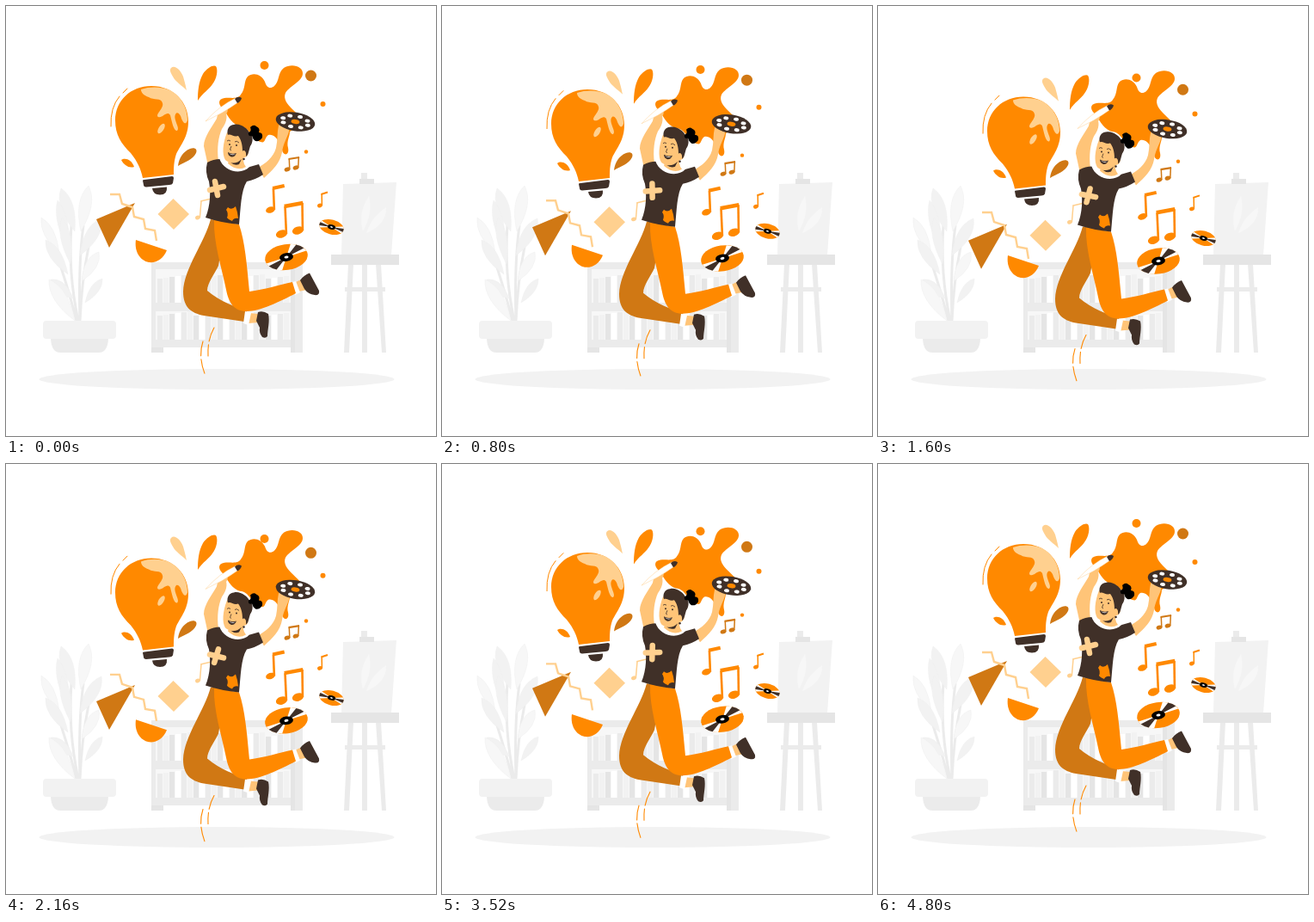
An HTML page for the animation above (4840 ms loop, 500x500 px).

```html
<!DOCTYPE html>
<html lang="en">
<head>
<meta charset="utf-8">
<title>Creative leap</title>
<style>
html, body { margin: 0; width: 100%; height: 100%; overflow: hidden; background: #fff; }
svg { display: block; width: 100vw; height: 100vh; }
.o { fill: #ff8900; } .b { fill: #d07814; } .l { fill: #ffd08f; }
.d { fill: #403028; } .s { fill: #ffc478; } .w { fill: #fff; }
.ln { fill: none; stroke: #ff8900; stroke-linecap: round; }
.g1 { fill: #f2f2f2; } .g2 { fill: #ebebeb; } .g3 { fill: #e5e5e5; } .g4 { fill: #f7f7f7; }
</style>
</head>
<body>
<svg viewBox="0 0 500 500">
  <g id="room">
    <ellipse class="g1" cx="245" cy="434" rx="206.5" ry="12"/>
    <g id="plant"></g>
    <path class="g2" d="M52 387H119Q118 403 108 403H63Q53 403 52 387Z"/>
    <rect class="g1" x="43" y="366" width="85" height="21" rx="4"/>
    <path class="g4" d="M174 306H331V389H174Z"/>
    <g id="books"></g>
    <path class="g2" d="M169 298H345V403H331V397H183V403H169Z M174 306V345H331V306Z M174 355V388H331V355Z" fill-rule="evenodd"/>
    <path class="g3" d="M331 298H336V403H331Z M169 397H183V403H169Z"/>
    <path class="g2" d="M398 300H404L399 403H393Z M430 300H436L442 403H437Z M414 300H420V403H414Z M394 327H441V332H394Z M413 194H420V207H413Z"/>
    <path class="g1" d="M392 207L454 205L448 290H390Z"/>
    <path class="g3" d="M411 201H428V207H411Z M378 289H457V301H378Z"/>
    <path class="g4" d="M415 262Q409 240 422 221Q427 241 415 262Z M419 264Q424 246 442 234Q443 254 419 264Z"/>
  </g>

  <path data-m="8 2400" class="o" d="M254 121C246 115 246 108 254 107C262 106 269 109 273 103C279 96 276 88 281 82C287 77 297 79 301 88C303 95 307 97 312 93C318 88 316 77 323 72C332 66 346 70 345 79C344 88 331 92 325 101C322 108 327 114 333 120C340 127 345 130 345 138L330 146C330 152 326 157 328 165C330 174 322 175 321 167C318 158 313 148 305 150C300 154 302 160 296 158C285 155 283 140 272 140C264 138 258 129 254 121Z"/>
  <circle data-m="18 2250" class="o" cx="300.5" cy="69" r="5"/>
  <circle data-m="24 2600" class="b" cx="354.5" cy="81" r="6.5"/>
  <circle data-m="17 2600" class="o" cx="368.5" cy="114" r="3"/>
  <circle data-m="13 2100" class="o" cx="349" cy="169.5" r="2.2"/>

  <path data-m="14 2000" class="l" d="M192 72C196 68 203 74 206 82C208 89 209 93 210 98C204 92 197 88 194 82C191 77 190 74 192 72Z"/>
  <path data-m="13 2200" class="o" d="M244 70C247 74 245 85 240 91C236 97 229 101 223 110C223 99 224 88 229 79C234 71 242 68 244 70Z"/>
  <path data-m="20 2750" class="o" d="M134 179C138 176 146 178 149 187C143 189 137 185 134 179Z"/>
  <path data-m="17 2200" class="b" d="M200 186C201 177 206 169 214 166C219 164 223 166 221 171C217 179 208 181 200 186Z"/>
  <path data-m="12 2600" class="ln" stroke-width="1" d="M141 96L136 101M132 105Q121 118 122 140"/>

  <g data-m="17 2450">
    <path class="o" d="M169 93C195 93 212 112 212 134C212 152 204 160 198 172C195 181 195 189 195 196L159 200C157 190 153 181 145 171C134 160 127 150 127 133C127 110 145 93 169 93Z"/>
    <path class="l" d="M157 97C168 93 182 94 191 98C204 105 211 119 211 133C209 139 206 136 204 131C203 126 199 122 197 126C194 132 203 142 199 145C195 146 193 135 191 127C187 121 182 131 177 129C173 126 184 119 182 113C180 106 172 110 166 106C160 104 157 101 157 97Z"/>
    <ellipse class="l" cx="180.5" cy="142.5" rx="3" ry="6.5" transform="rotate(32 180.5 142.5)"/>
    <path class="d" d="M159 203Q159 202 161 202L193 198Q195 198 195 200L194 206Q193 208 190 208L163 210.500Q160 210 160 208ZM170 212L187 210.500Q188 219.500 179 219.500Q171 219.500 170 212Z"/>
  </g>

  <path data-m="28 2050" class="b" d="M105 248L150 229L120 281Z"/>
  <path data-m="26 2250" fill="none" stroke="#ffd08f" stroke-width="2.4" d="M121 219H132L135 230L147 234L149 245L160 248L162 259L173 261L175 273"/>
  <path data-m="28 2700" class="o" d="M151 272L187 284C183 294 175 299 166 298C156 296 149 286 151 272Z"/>
  <path data-m="28 2050" class="l" d="M194.500 224L213 242L195 260L176.500 242Z"/>
  <g data-m="6 2100" data-note="223 246 3 2.300 4 -19 11 -3 1.500" stroke="#ffd08f"></g>

  <g data-m="12 2500">
    <path class="ln" stroke-width="1.100" stroke-dasharray="17 4" d="M242 374Q234 388 235 407M229 390Q223 408 232 430"/>
    <path class="s" d="M245 131C240 140 230 152 230 163L235 186L247 180C245 165 247 152 251 143C258 134 258 124 253 121C248 120 246 126 245 131Z"/>
    <path class="s" d="M249 119Q254 114 258 119Q258 128 250 128Z"/>
    <path class="w" d="M232 134Q248 116 267 107L270 112Q252 125 232 134Z" stroke="#ffc478" stroke-width=".4"/>
    <path class="d" d="M266 108Q270 104 274 107Q273 111 269 113Z"/>
    <path class="s" d="M283 357L293 358L293 368L282 369ZM337 321L345 317L350 330L340 332Z"/>
    <path class="d" d="M293 356Q299 354 305 358C307 367 304 376 304 384Q302 387 298 385Q294 380 295 374L291 366ZM342 319Q346 313 353 310.500L364 331Q365 337 359 336Q351 335 347 329Z"/>
    <path class="b" d="M238 248C231 275 207 305 206 332C206 350 215 357 230 360L277 367L280 354C268 350 249 344 234 331C234 322 243 311 247 302L256 250Z"/>
    <path class="w" d="M278 355L285 357L282 371L276 369ZM333 321L337 320L342 333L336 336Z"/>
    <path class="o" d="M242 249L271 254C278 275 280 300 283 332C300 330 318 324 333 321L337 334C318 344 295 355 280 355C265 355 259 345 256 330C251 305 241 275 242 249Z"/>
    <path class="s" d="M317 139C320 134 331 138 329 146C327 153 322 161 321 170C319 182 310 191 300 200L293 188C302 183 311 176 314 165C316 156 315 147 317 139Z"/>
    <path class="d" d="M234 182Q241 178 249 178C256 188 270 193 280 188L294 184L299 196Q290 202 280 204C273 215 273 235 271 254Q250 252 232 246C238 232 238 215 236 204Q231 193 234 182Z"/>
    <path class="w" d="M248 177Q252 178 257 182L278 185L283 187C274 197 253 193 248 177Z"/>
    <path class="s" d="M260 177L277 171Q274 181 279 187Q269 193 258 183Z"/>
    <path class="d" d="M261 182Q268 184 274 178L271 184Q266 186 261 182Z"/>
    <path class="s" d="M257 147C252 160 251 172 255 179C260 184 270 182 274 177Q281 177 282 170Q282 157 275 149Z"/>
    <path class="d" d="M258 150C256 143 260 138 265 138C272 136 281 142 284 149C288 151 287 160 284 163C282 169 282 173 279 175C280 168 276 167 275 169C275 160 273 155 270 151C265 153 261 148 258 150Z"/>
    <path d="M284 141Q288 137 291 140Q296 142 294 147Q299 147 298 153Q295 158 290 157Q287 155 286 151Q281 152 282 147Q286 146 284 141Z"/>
    <circle class="d" cx="260" cy="161" r="1"/><circle class="d" cx="268" cy="162" r="1"/>
    <path fill="none" stroke="#403028" stroke-width=".8" d="M257 157Q259 155 261 157M266 158Q268 156 271 159M262 163L260.500 167L262 168"/>
    <path class="d" d="M258 170Q263 173 268 171Q266 176 262 175.500Q258 174 258 170Z"/>
    <path class="w" d="M259 171Q263 173.500 267 172Q263 175 259 171Z"/>
    <circle class="d" cx="276.500" cy="178" r="1.300"/>
    <path class="o" d="M258 234Q262 238 267 233L269 240L270 247Q265 246 263 250Q258 248 257 246Q259 241 256 237Z"/>
    <g transform="translate(245 212)">
      <path data-m="0 2000 28" fill="none" stroke="#ffd08f" stroke-width="6.500" stroke-linecap="round" d="M-2 -8L1 8M-8 2L8 -2"/>
    </g>
    <g transform="translate(336.500 134.500) rotate(9)">
      <ellipse class="d" rx="23" ry="10.800"/>
      <g id="paints"></g>
      <ellipse class="o" rx="5" ry="2.600"/>
    </g>
  </g>

  <g data-m="11 2650" data-note="320.500 265 6.800 4.500 4 -32 20 -4 4.500" data-pair="1" stroke="#ff8900"></g>
  <g data-m="9.500 2200" data-note="307.500 237 5.500 3.600 3.400 -25 12 -3 4" stroke="#ff8900"></g>
  <g data-m="12.500 1800" data-note="327 190 3.500 2.400 2.300 -12 11 -2 2.200" data-pair="1" stroke="#d07814"></g>
  <g data-m="6 2700" data-note="365 232 3 2.300 2.200 -13 6 -2.500 2" stroke="#ff8900"></g>
  <g data-m="7 2700" data-disc="326 292 25 15 -8 -58"></g>
  <g data-m="15 2100" data-disc="378.500 257 14.500 8.500 15 -12"></g>
</svg>
<script>
const LOOP = 4840;
const $ = id => document.getElementById(id);
const nums = s => s.split(' ').map(Number);

// leaves: base x, base y, tip x, tip y, half width
const leaves = [
  [87, 262, 96, 209, 10], [80, 262, 64, 212, 10], [73, 285, 60, 226, 8], [62, 288, 41, 246, 8],
  [86, 290, 111, 247, 10], [72, 312, 46, 272, 9], [88, 320, 108, 286, 9], [78, 340, 52, 318, 9],
  [75, 300, 65, 246, 8], [80, 366, 50, 318, 10], [92, 345, 112, 317, 7]
];
$('plant').innerHTML =
  '<path fill="none" stroke="#ebebeb" stroke-width="3" d="M84 366Q72 310 76 255M86 366Q84 300 90 255M86 366Q88 320 96 280M82 366Q70 320 56 280"/>' +
  leaves.map(([x, y, u, v, w], i) => {
    const len = Math.hypot(u - x, v - y), nx = (y - v) / len * w * 1.4, ny = (u - x) / len * w * 1.4;
    const mx = x + (u - x) * .65, my = y + (v - y) * .65;
    return `<path class="${i % 3 ? 'g1' : 'g4'}" stroke="#efefef" stroke-width=".5" d="M${x} ${y}Q${mx + nx} ${my + ny} ${u} ${v}Q${mx - nx} ${my - ny} ${x} ${y}Z"/>`;
  }).join('');

let books = '';
for (const bottom of [345, 388])
  for (let x = 176, i = 0; x < 326; i++) {
    const w = 6 + i * 5 % 5, h = 28 + i * 7 % 6;
    books += `<rect class="${['g2', 'g1', 'g3', 'w'][i % 4]}" x="${x}" y="${bottom - h}" width="${w}" height="${h}"/>`;
    x += w + 1;
  }
$('books').innerHTML = books;

for (let i = 0; i < 8; i++) {
  const a = i * Math.PI / 4 + .3;
  $('paints').innerHTML += `<ellipse class="w" cx="${15.5 * Math.cos(a)}" cy="${6.6 * Math.sin(a)}" rx="3" ry="2"/>`;
}

for (const g of document.querySelectorAll('[data-note]')) {
  const [x, y, rx, ry, sx, h, w, rise, beam] = nums(g.dataset.note);
  const color = g.getAttribute('stroke'), x1 = x + sx, top = y + h, x2 = x1 + w;
  const head = (cx, cy) => `<ellipse transform="translate(${cx} ${cy}) rotate(-18)" rx="${rx}" ry="${ry}" fill="${color}" stroke="none"/>`;
  g.setAttribute('fill', 'none');
  g.setAttribute('stroke-width', rx > 5 ? 2.6 : 1.5);
  g.innerHTML = head(x, y) + `<path d="M${x + rx * .8} ${y}L${x1} ${top}"/>` +
    `<path stroke-width="${beam}" d="M${x1 - .8} ${top}L${x2 + .8} ${top + rise}"/>` +
    (g.dataset.pair ? head(x + w - 1, y + rise) + `<path d="M${x + w - 1 + rx * .8} ${y + rise}L${x2} ${top + rise}"/>` : '');
}

function wedge(from, to, cls) {
  const p = a => `${Math.cos(a * Math.PI / 180)} ${Math.sin(a * Math.PI / 180)}`;
  return `<path class="${cls}" d="M0 0L${p(from)}A1 1 0 0 1 ${p(to)}Z"/>`;
}
for (const g of document.querySelectorAll('[data-disc]')) {
  const [x, y, rx, ry, turn, dark] = nums(g.dataset.disc);
  let s = `<g transform="translate(${x} ${y}) rotate(${turn}) scale(${rx} ${ry})"><circle class="o" r="1"/>`;
  for (const a of [dark, dark + 180])
    s += wedge(a - 16, a + 42, 'w') + wedge(a, a + 28, 'd');
  g.innerHTML = s + '<circle r=".32"/><circle class="w" r=".1"/></g>';
}

// sinks until the low time, then rises back
const sink = (t, low) => {
  const k = t < low ? t / low : (LOOP - t) / (LOOP - low);
  return (1 - Math.cos(Math.PI * k)) / 2;
};
const movers = [...document.querySelectorAll('[data-m]')].map(el => [el, ...nums(el.dataset.m)]);

function draw(now) {
  const t = now % LOOP;
  for (const [el, depth, low, turn = 0] of movers) {
    const k = sink(t, low);
    el.setAttribute('transform', `translate(0 ${(depth * k).toFixed(2)}) rotate(${(turn * k).toFixed(2)})`);
  }
  requestAnimationFrame(draw);
}
draw(0);
</script>
</body>
</html>
```
